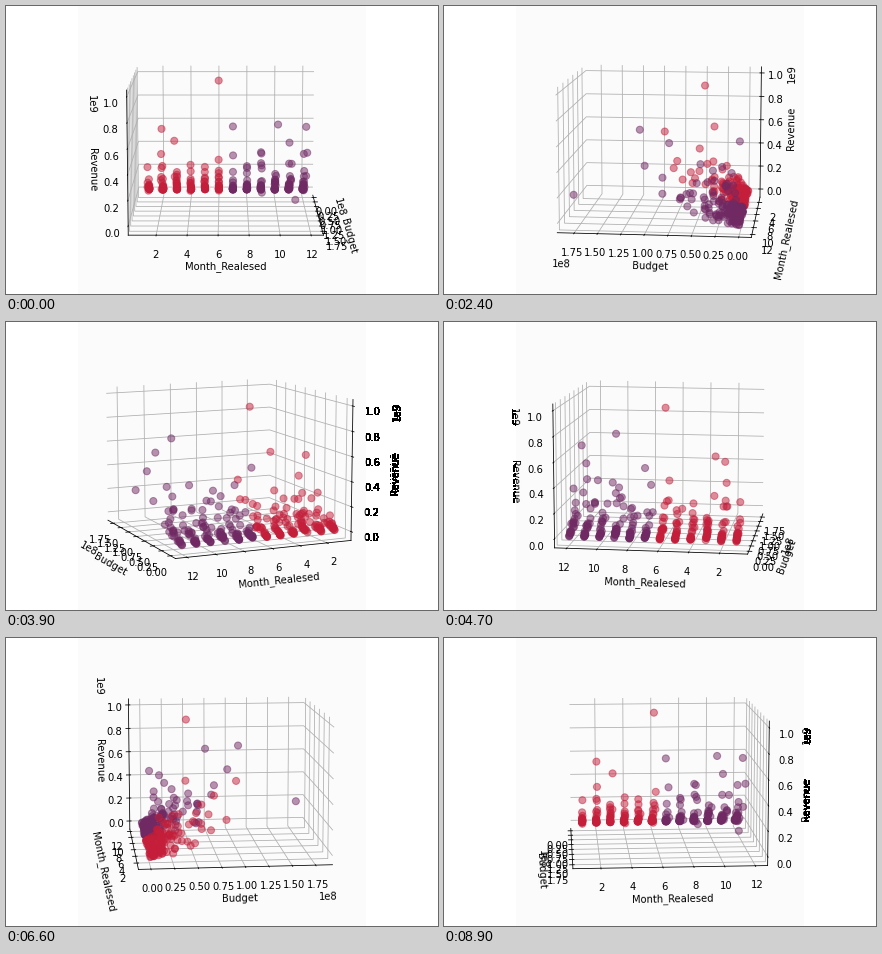
These frames come from a looping animation (432 px wide and 288 px high, 9000 ms). A matplotlib script:

```python
import matplotlib.pyplot as plt
import numpy as np
from matplotlib.animation import FuncAnimation
from matplotlib.artist import Artist

FRAMES, INTERVAL = 90, 100
RED, PURPLE = "#c41e3a", "#702963"
TOP_BUDGET, TOP_REVENUE = 1.8, .98

# Key points: month, budget (1e8), revenue (1e9)
HITS = [
    (6, .45, TOP_REVENUE), (2, .39, .57), (3, .95, .54), (2, .56, .38),
    (7, .05, .55), (10, 1.10, .69), (11, .20, .43), (12, .75, .63),
    (12, 1.01, .45), (11, TOP_BUDGET, .185),
]


def make_data(per_month=22, mid_hits=20):
    """A crowd of small films per month, some mid-size hits, the key points."""
    rng = np.random.default_rng(12)

    month = np.repeat(np.arange(1, 13), per_month)
    budget = np.minimum(rng.exponential(.13, month.size), .6)
    gain = .1 + rng.exponential(.3, month.size)
    crowd = [month, budget, np.minimum(budget * gain, .25)]

    # Mid-size hits fall mostly in the later months
    mid = [np.ceil(12 * rng.random(mid_hits) ** .6),
           rng.uniform(.1, .85, mid_hits),
           rng.uniform(.15, .36, mid_hits)]
    return np.hstack([crowd, mid, np.transpose(HITS)])


def padded(lo, hi):
    """Limits with a 5% margin and the 1/48 gap to the panes."""
    pad = (hi - lo) * (.05 + 1.1 / 48)
    return lo - pad, hi + pad


class HardEdges(Artist):
    """Turns soft text edges beside the square plot area solid black."""

    def draw(self, renderer):
        if not hasattr(renderer, "buffer_rgba"):
            return
        px = np.asarray(renderer.buffer_rgba())
        if not px.flags.writeable:
            return
        h, w = px.shape[:2]
        side = (w - h) // 2
        for strip in (px[:, :side], px[:, w - side:]):
            strip[strip[..., :3].min(axis=2) < 254, :3] = 0


fig = plt.figure(figsize=(6, 4), dpi=72, facecolor="white")
ax = fig.add_axes([0, 0, 1, 1], projection="3d", facecolor="#fbfbfb")

month, budget, revenue = make_data()
colors = np.where(month <= 6, RED, PURPLE)
ax.scatter(budget * 1e8, month, revenue * 1e9, c=list(colors), s=50,
           alpha=.5, depthshade=False)

ax.set_xlim(*padded(0, TOP_BUDGET * 1e8))
ax.set_ylim(*padded(1, 12))
ax.set_zlim(*padded(0, TOP_REVENUE * 1e9))
ax.set_xticks(np.arange(8) * .25e8)
ax.set_yticks(np.arange(2, 13, 2))
ax.set_zticks(np.arange(6) * .2e9)
ax.set_xlabel("Budget")
ax.set_ylabel("Month_Realesed")
ax.set_zlabel("Revenue")
for axis in (ax.xaxis, ax.yaxis, ax.zaxis):
    axis.set_pane_color((1, 1, 1, 0))

edges = HardEdges()
edges.set_zorder(100)
fig.add_artist(edges)


def update(i):
    # The tiny offset keeps the axes on a definite side in head-on views
    ax.view_init(elev=10, azim=i * 360 / FRAMES + .01)
    return []


anim = FuncAnimation(fig, update, frames=FRAMES, interval=INTERVAL,
                     init_func=lambda: update(0), repeat=True)
plt.show()
```
